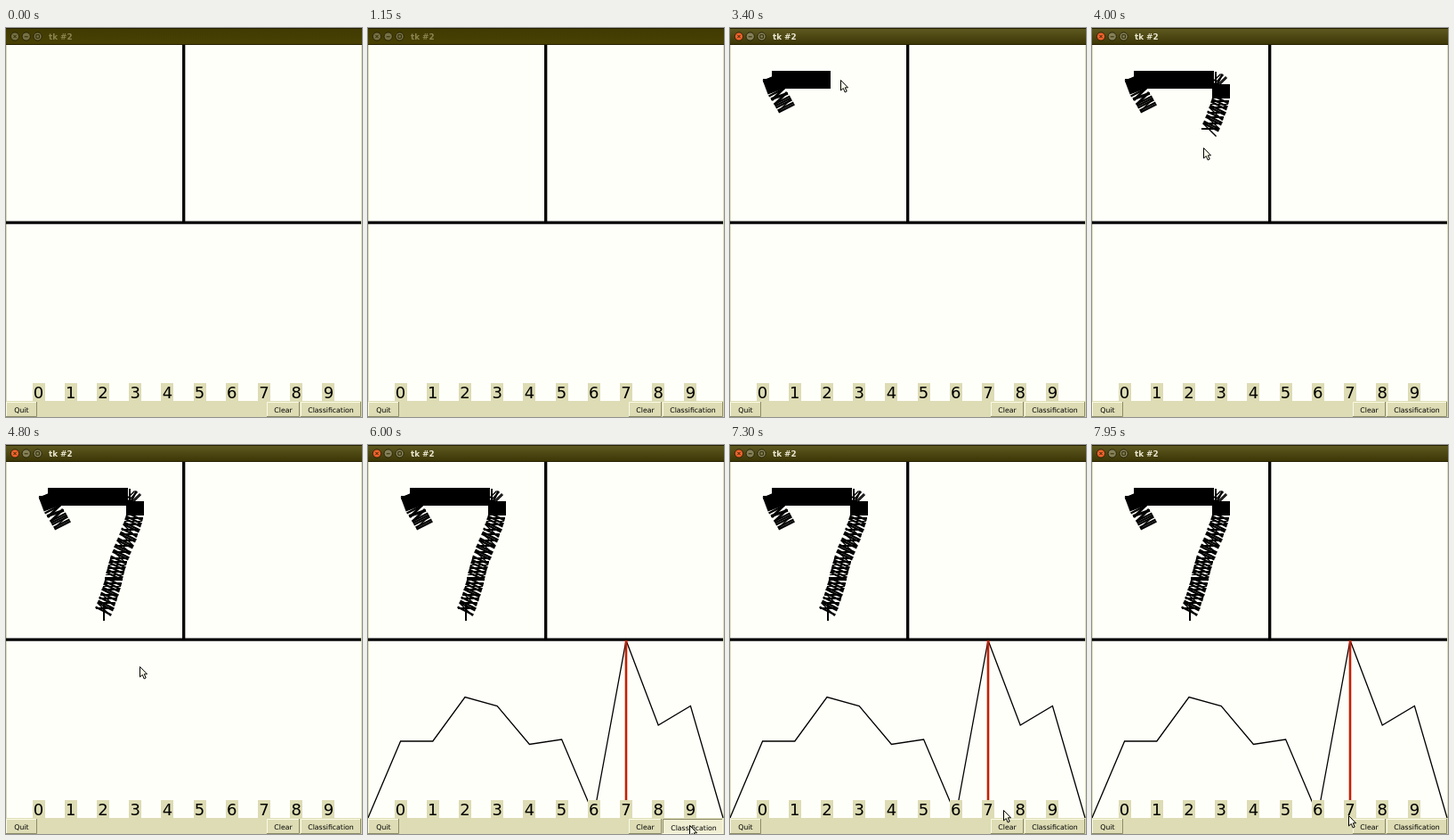
An HTML page for the animation above (8 s loop, 400 by 436 pixels).

```html
<!DOCTYPE html>
<html>
<head>
<meta charset="utf-8">
<style>
html, body { margin: 0; width: 100%; height: 100%; overflow: hidden; background: #fffffa; }
svg { display: block; width: 400px; height: 436px; font-family: "DejaVu Sans", sans-serif; }
#ink line { stroke: #000; stroke-width: 20; }
</style>
</head>
<body>
<svg id="stage" viewBox="0 0 400 436">
  <defs>
    <linearGradient id="barOn" x2="0" y2="1">
      <stop offset="0" stop-color="#605a22"/><stop offset="1" stop-color="#3a3504"/>
    </linearGradient>
    <linearGradient id="barOff" x2="0" y2="1">
      <stop offset="0" stop-color="#403a02"/><stop offset="1" stop-color="#4a4204"/>
    </linearGradient>
  </defs>
  <rect width="400" height="436" fill="#fffffa"/>
  <path d="M.5 19V436M399.5 19V436" stroke="#dcdcb8"/>
  <g id="ink"></g>
  <path d="M199.7 19V217M0 218.2H399" stroke="#000" stroke-width="3.3"/>
  <g id="chart" fill="none">
    <polyline id="curve" stroke="#000" stroke-width="1.3"/>
    <path d="M290 219V400" stroke="#c42004" stroke-width="2.6"/>
  </g>
  <g id="digits" font-size="18" text-anchor="middle"></g>
  <rect y="418" width="400" height="18" fill="#dddcb4"/>
  <g id="buttons" font-size="7.8" text-anchor="middle"></g>
  <g id="title">
    <rect id="bar" width="400" height="19"/>
    <path d="M0 .5H400M0 18.5H400" stroke="#252000"/>
    <g stroke="#1c1800" stroke-width=".8">
      <circle id="close" cx="10" cy="9.5" r="4.6"/>
      <circle class="knob" cx="22.7" cy="9.5" r="4.6"/>
      <circle class="knob" cx="35.6" cy="9.5" r="4.6"/>
    </g>
    <path d="M8.3 7.8L11.7 11.2M11.7 7.8L8.3 11.2M20.7 9.8H24.7M33.8 7.7H37.4V11.3H33.8Z" fill="none" stroke="#2c2800"/>
    <text id="name" x="48" y="12.8" font-size="8.8" font-weight="bold">tk #2</text>
  </g>
  <path id="cursor" d="M.5 .5V12L3.3 9.5L5.2 14L7.2 13L5.3 8.8H8.5Z" fill="#ffffec" stroke="#000"/>
</svg>
<script>
const LOOP = 8000, STEP = 50, INK_LAG = 100;
const ENTER = 1950, FOCUS = 2400, PEN_DOWN = 2540, PEN_UP = 4300;
const HOVER = [5450, 6450], PRESS = [5700, 6200], RESULT = 5850;

// Pointer track: time, x, y
const track = [
  [1950, 0, 22], [2200, 43, 51], [2400, 64, 91], [2540, 64, 91],
  [2590, 59, 82], [2640, 52, 71], [2650, 46, 55], [2670, 47, 58],
  [3400, 124, 58], [3510, 135, 58], [3560, 140, 59], [3600, 145, 63],
  [3690, 145, 77], [3770, 141, 92], [3870, 134, 110], [3980, 126, 130],
  [4090, 121, 150], [4170, 117, 165], [4250, 112, 180], [4290, 109, 187],
  [4300, 111, 187], [4450, 111, 187], [4800, 150, 248], [5250, 342, 408],
  [5500, 361, 426], [6250, 361, 426], [6650, 357, 403], [7000, 322, 404],
  [7700, 288, 415], [8000, 288, 415]
];

const $ = id => document.getElementById(id);
function add(parent, tag, attrs, text) {
  const node = document.createElementNS("http://www.w3.org/2000/svg", tag);
  for (const key in attrs) node.setAttribute(key, attrs[key]);
  if (text !== undefined) node.textContent = text;
  return parent.appendChild(node);
}

function pointerAt(t) {
  const i = Math.max(1, track.findIndex(key => key[0] >= t));
  const [t0, x0, y0] = track[i - 1], [t1, x1, y1] = track[i];
  const k = (t - t0) / (t1 - t0);
  return [Math.round(x0 + (x1 - x0) * k), Math.round(y0 + (y1 - y0) * k)];
}

// Each pointer event adds a short, very wide line; whole-pixel steps give the ragged edges.
const ink = [];
for (let t = PEN_DOWN + 10; t <= PEN_UP; t += 10) {
  const [x1, y1] = pointerAt(t - 10), [x2, y2] = pointerAt(t);
  if (x1 !== x2 || y1 !== y2) ink.push({ at: t + INK_LAG, node: add($("ink"), "line", { x1, y1, x2, y2 }) });
}

const columnX = i => 0.4 + 36.2 * (i + 1);
const scores = [332, 332, 282.5, 292.5, 335.5, 330, 415, 219, 314, 292.5];
$("curve").setAttribute("points",
  ["0,418", ...scores.map((y, i) => columnX(i) + "," + y), "399,418"].join(" "));
scores.forEach((_, i) => {
  add($("digits"), "rect", { x: Math.round(columnX(i) - 7), y: 398, width: 14, height: 20, fill: "#dddcb4" });
  add($("digits"), "text", { x: columnX(i), y: 415 }, i);
});

function makeButton(label, x, width) {
  const face = add($("buttons"), "rect", { x, y: 419, width, height: 17, fill: "#dddcb4" });
  const light = add($("buttons"), "path", { d: `M${x + .5} 436V419.5H${x + width}`, fill: "none" });
  const dark = add($("buttons"), "path", { d: `M${x} 435.5H${x + width - .5}V419`, fill: "none" });
  const text = add($("buttons"), "text", { x: x + width / 2, y: 430.5 }, label);
  return (hover, pressed) => {
    face.setAttribute("fill", hover ? "#efeed2" : "#dddcb4");
    light.setAttribute("stroke", pressed ? "#8c8b68" : "#fafae4");
    dark.setAttribute("stroke", pressed ? "#fafae4" : "#8c8b68");
    text.setAttribute("transform", pressed ? "translate(1 1.5)" : "");
  };
}
makeButton("Quit", 0, 35)(false, false);
makeButton("Clear", 293, 37)(false, false);
const paintClassify = makeButton("Classification", 331, 68);

const within = (t, [from, to]) => t >= from && t < to;
const show = (node, on) => node.setAttribute("visibility", on ? "visible" : "hidden");

function draw(t) {
  const active = t >= FOCUS;
  $("bar").setAttribute("fill", active ? "url(#barOn)" : "url(#barOff)");
  $("close").setAttribute("fill", active ? "#f0622e" : "#777044");
  document.querySelectorAll(".knob").forEach(k => k.setAttribute("fill", active ? "#858058" : "#777044"));
  $("name").setAttribute("fill", active ? "#e9e6d0" : "#8b8450");
  ink.forEach(({ at, node }) => show(node, t >= at));
  show($("chart"), t >= RESULT);
  paintClassify(within(t, HOVER), within(t, PRESS));
  show($("cursor"), t >= ENTER);
  if (t >= ENTER) $("cursor").setAttribute("transform", `translate(${pointerAt(t)})`);
}

const start = performance.now();
function tick(now) {
  const t = Math.max(0, now - start) % LOOP;
  draw(Math.floor(t / STEP) * STEP);
  requestAnimationFrame(tick);
}
draw(0);
requestAnimationFrame(tick);
</script>
</body>
</html>
```
